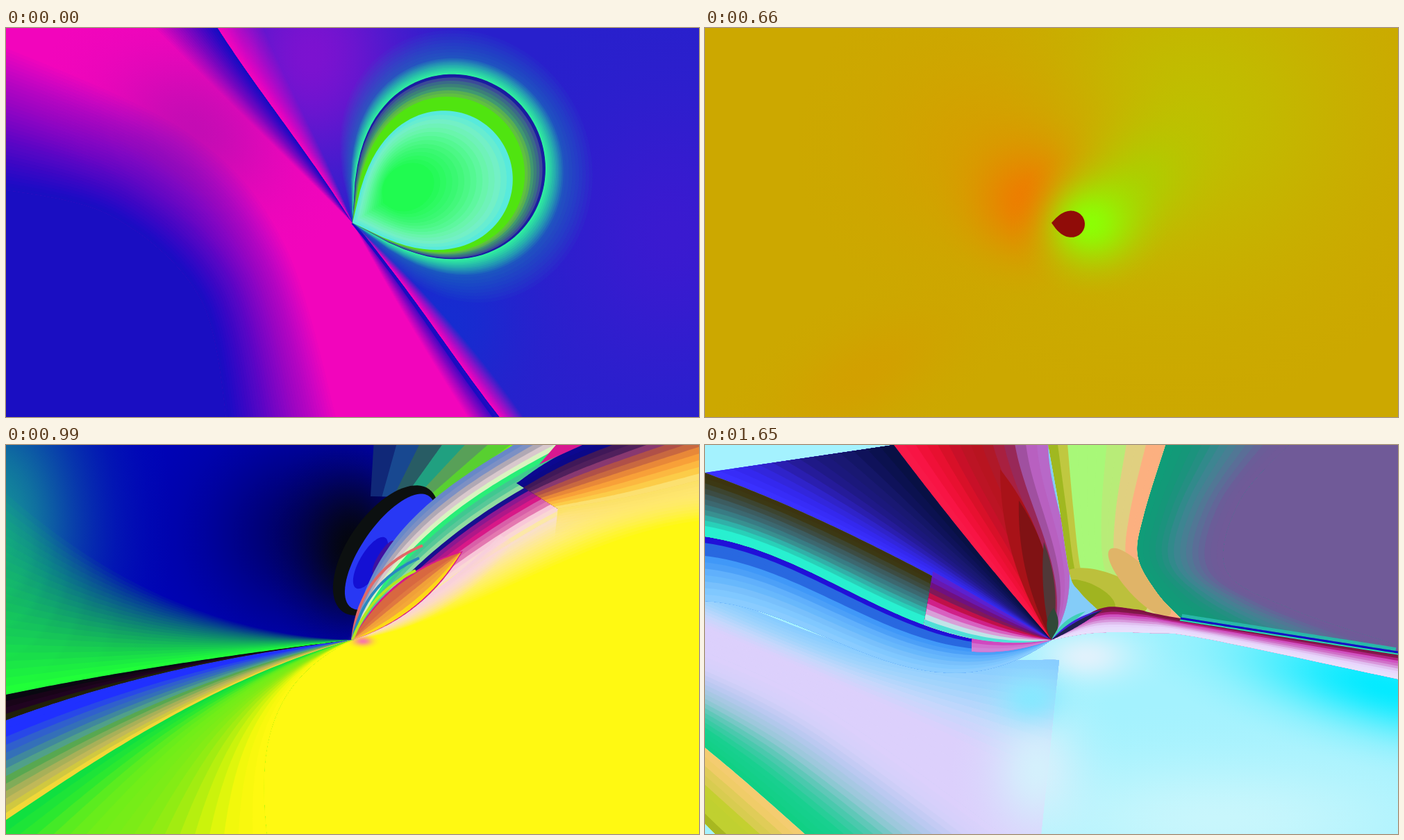
An HTML page with a canvas for the animation above (1.98 s loop, 998 by 561 pixels).

```html
<!DOCTYPE html>
<html lang="en">
<head>
<meta charset="utf-8">
<title>Colour fields</title>
<style>
html, body { margin: 0; width: 100%; height: 100%; overflow: hidden; }
canvas { display: block; width: 998px; height: 561px; }
</style>
</head>
<body>
<canvas id="stage" width="998" height="561"></canvas>
<script>
const W = 998, H = 561, STEP = 330, N = 80;
const CX = 499, CY = 281;
const RIGHT = [[W, H], [W, 0]], LEFT = [[0, H], [0, 0]];
let g;

const mix = (a, b, t) => a + (b - a) * t;
const samples = f => Array.from({ length: N + 1 }, (_, k) => f(k / N));
const rad = deg => deg * Math.PI / 180;

// Smooth curve through a few points
function curve(...p) {
  const last = p.length / 2 - 1;
  const at = (i, axis) => p[2 * Math.min(last, Math.max(0, i)) + axis];
  return samples(s => {
    const i = Math.min(Math.floor(s * last), last - 1), t = s * last - i;
    return [0, 1].map(axis => {
      const [a, b, c, d] = [-1, 0, 1, 2].map(j => at(i + j, axis));
      return b + t * (c - a + t * (2 * a - 5 * b + 4 * c - d + t * (3 * (b - c) + d - a))) / 2;
    });
  });
}
// Ray from the centre to (x, y), bent sideways by a, then b
function ray(x, y, a = 0, b = a) {
  const dx = x - CX, dy = y - CY, len = Math.hypot(dx, dy);
  return samples(t => {
    const s = 1 - t, side = 3 * t * s * (s * a + t * b) / len;
    return [CX + dx * t - dy * side, CY + dy * t + dx * side];
  });
}
// Drop with its tip in the centre, open between two angles
function rose(r, from, to) {
  return samples(t => {
    const a = rad(mix(from, to, t)), d = r * Math.sqrt(Math.abs(Math.sin(Math.PI * t)));
    return [CX + d * Math.cos(a), CY + d * Math.sin(a)];
  });
}
function oval(x, y, rx, ry, tilt = 0) {
  const c = Math.cos(rad(tilt)), s = Math.sin(rad(tilt));
  return samples(t => {
    const a = Math.PI * (1 + 2 * t), u = rx * Math.cos(a), v = ry * Math.sin(a);
    return [x + u * c - v * s, y + u * s + v * c];
  });
}
const toward = (pts, x, y, t) => pts.map(p => [mix(p[0], x, t), mix(p[1], y, t)]);
const part = (pts, t) => pts.slice(0, Math.round(N * t));
const rev = pts => [...pts].reverse();

function trace(pts) {
  g.beginPath();
  pts.forEach(([x, y]) => g.lineTo(x, y));
}
function fill(pts, color) {
  trace(pts);
  g.fillStyle = color;
  g.fill();
}
function line(pts, color, width) {
  trace(pts);
  g.strokeStyle = color;
  g.lineWidth = width;
  g.stroke();
}
function within(shape, draw) {
  g.save();
  trace(shape);
  g.clip();
  draw();
  g.restore();
}

const rgb = hex => [1, 3, 5].map(i => parseInt(hex.slice(i, i + 2), 16));
function ramp(colors, t) {
  const u = t * (colors.length - 1), i = Math.floor(u);
  const a = rgb(colors[i]), b = rgb(colors[i + 1] || colors[i]);
  return `rgb(${a.map((v, k) => Math.round(mix(v, b[k], u - i)))})`;
}
function strips(a, b, n, paint) {
  for (let i = 0; i < n; i++) {
    const edge = a.map(([x, y], k) => [mix(x, b[k][0], i / n), mix(y, b[k][1], i / n)]);
    paint([...edge, ...rev(b)], i);
  }
}
// Bands of colour between two curves
function sweep(a, b, colors, n) {
  const list = colors.split(' ');
  n = n || list.length;
  strips(a, b, n, (pts, i) => fill(pts, ramp(list, n > 1 ? i / (n - 1) : 0)));
}
// Bands between two closed rings
function rings(a, b, colors, n) {
  const list = colors.split(' ');
  for (let i = 0; i < n; i++)
    fill(a.map(([x, y], k) => [mix(x, b[k][0], i / n), mix(y, b[k][1], i / n)]), ramp(list, i / (n - 1)));
}
// One colour growing from clear at a to solid at b
function fade(a, b, color, n = 24) {
  strips(a, b, n, (pts, i) => {
    g.globalAlpha = 1 / (n - i);
    fill(pts, color);
  });
  g.globalAlpha = 1;
}
const leaf = (x, y, left, right, colors) => sweep(ray(x, y, -left), ray(x, y, right), colors);

// Soft spot of colour with a bell-shaped falloff
function glow(x, y, rx, ry, color, tilt = 0) {
  const grad = g.createRadialGradient(0, 0, 0, 0, 0, 1), end = Math.exp(-4);
  for (let t = 0; t <= 1; t += 1 / 16) {
    const a = (Math.exp(-4 * t * t) - end) / (1 - end);
    grad.addColorStop(t, `rgba(${rgb(color)},${a})`);
  }
  g.save();
  g.translate(x, y);
  g.rotate(rad(tilt));
  g.scale(rx, ry);
  g.fillStyle = grad;
  g.fillRect(-1, -1, 2, 2);
  g.restore();
}

function drop() {
  const up = ray(305, 0, 6, -4), down = ray(711, 561, -10, 2);
  g.fillStyle = '#f205bc';
  g.fillRect(0, 0, W, H);
  glow(270, 150, 240, 190, '#c40cb4', 30);
  const cold = curve(-20, 230, 150, 270, 280, 390, 320, 580);
  fade(curve(-20, 20, 260, 150, 400, 310, 480, 580), cold, '#1a0ec2', 40);
  fill([...cold, [0, H]], '#1a0ec2');
  within([...rev(up), ...down, ...RIGHT], () => {
    g.fillStyle = '#2820cc';
    g.fillRect(0, 0, W, H);
    glow(440, 40, 260, 330, '#7c12d0');
    glow(640, 420, 190, 240, '#162cd0');
    glow(960, 300, 300, 380, '#3a1ad0');
  });
  fade(ray(215, 0), up, '#160cc2');
  fade(ray(665, 561, 4), down, '#160cc2');
  fade(ray(370, 0, 8, -4), up, '#f405bc');
  fade(ray(745, 561, -14), down, '#f405bc');
  line(ray(703, 561, -8, 2), '#1a0cc0', 4);

  const rim = rose(298, -88, 30), lime = rose(265, -82, 27.5), cyan = rose(245, -78, 27);
  fade(rose(362, -104, 50), rim, '#1c70b8', 14);
  fade(rose(322, -94, 38), rim, '#30eca0', 10);
  rings(rim, lime, '#1a1ca0 #3c4a98 #3a6a88 #3c8078 #409870 #58b050 #60c040', 7);
  fill(lime, '#50e410');
  rings(cyan, oval(575, 230, 35, 28, -35), '#58eadc #74f0c8 #6cf4b0 #58f898 #48f880 #38f870 #2cfa60 #20fb50', 14);
}

function wave() {
  g.fillStyle = '#a0c42c';
  g.fillRect(0, 0, W, H);
  glow(20, 10, 330, 160, '#14b048');
  glow(330, 350, 200, 120, '#a8d834', -30);
  glow(40, 190, 190, 90, '#a8a010');
  const sun = curve(325, -10, 365, 120, 495, 278);
  fade(curve(170, -10, 190, 150, 300, 330), sun, '#feff02', 20);
  fill([...sun, [700, 200], [800, -10]], '#feff02');
  rings(oval(10, 420, 215, 245), oval(15, 500, 60, 60), '#a4a414 #98900c #786408 #604c06 #503608', 18);

  const hill = curve(CX, CY, 560, 245, 615, 232, 665, 258, 735, 333, 805, 358, 900, 335, W, 283);
  const sky = ray(830, 0, 20, -12);
  fill([...sky, [W, 0], [W, 420], [700, 420]], '#0850c0');
  within([...sky, [W, 0], [W, 420], [700, 420]], () => {
    glow(780, 310, 300, 200, '#005cb0');
    glow(740, 80, 180, 90, '#2058c8', -40);
  });
  fill([...hill, [W, H], [600, H]], '#ff54b4');
  const foot = ray(195, 561, 4, 2), night = ray(630, 561, 12, -22);
  sweep(night, curve(CX, CY, 570, 243, 640, 250, 690, 340, 730, 430, 790, 561),
    '#1c10ec #4018c8 #6020b0 #7c24a8 #9c30a4 #c040a8 #e450ac #fc56b2', 16);
  fill([...foot, ...rev(night)], '#0404ff');
  fade(ray(570, 561, 12, -10), night, '#1c10ec', 8);
  sweep(ray(636, 0, 12, -10), ray(704, 0, 30, -14), '#f4f430 #e8dc78 #dca89c #cf7a38 #cf7a28 #b04a80 #a81890 #a81890');
  sweep(ray(704, 0, 30, -14), sky, '#98f088 #6a9cc0 #6a9cc0 #4c80c4 #4478c8 #3870c8 #2860c8 #1858c4');
  sweep(ray(70, 561, 27, 25), foot,
    '#90a020 #78a828 #60a838 #38b040 #1ea838 #1ea838 #d08038 #d08038 #904050 #783058 #60e060 #50d860 #2878c8 #2868c0 #184050 #183858 #1020a0');
}

function ember() {
  g.fillStyle = '#cca800';
  g.fillRect(0, 0, W, H);
  glow(700, 130, 460, 420, '#c0be00', -50);
  glow(420, 190, 300, 270, '#d69e00', 20);
  glow(230, 500, 260, 120, '#d2a000', -30);
  glow(466, 249, 140, 140, '#ee7c00');
  glow(610, 240, 200, 130, '#acd000', -45);
  glow(554, 282, 115, 105, '#8cff04');
  fill(rose(48, -48, 55), '#900c08');
}

function petals() {
  g.fillStyle = '#0003b8';
  g.fillRect(0, 0, W, H);
  glow(450, 130, 300, 260, '#000060');
  glow(500, 150, 130, 180, '#04060c');
  glow(-20, 120, 260, 420, '#149098');
  const black = ray(0, 360, 6, 8), low = ray(0, 397, 18, 22), gold = ray(-40, 568, 44, 22);
  fade(ray(0, 70, -70, -60), black, '#20ff38');
  const far = ray(1100, 50, -19, -137);
  fill([...rev(low), ...far, [W, H], [0, H]], '#fff912');
  sweep(black, low, '#080810 #180418 #200420 #202008');
  sweep(low, gold, '#2030ff #2030ff #2848e8 #3060cc #3470b8 #40889c #50a088 #58a850 #80ac58 #a8b058 #c0b858 #d0c840 #f0d838');
  sweep(gold, ray(380, 600, 110, 60), '#10e040 #28e830 #58ec20 #70ee18 #78ec18 #88ec14 #a8ec10 #d0f40c #f4f80c #fef910', 18);

  sweep(curve(530, -10, 525, 74), curve(775, -10, 640, 76), '#102878 #184890 #285c64 #20a080 #58a058 #58d030 #78f010');
  fill(oval(547, 152, 108, 54, -55), '#0c1010');
  fill(oval(553, 154, 98, 40, -55), '#2838f4');
  fill(oval(525, 170, 42, 16, -60), '#1410d4');
  fill(oval(544, 162, 28, 8, -58), '#4010a0');
  sweep(ray(900, -120, -140, 0), far,
    '#6888c8 #7c90c4 #b0a8b4 #d8c8cc #d8f4c0 #28ee78 #40c890 #58c898 #90dca0 #181090 #8c1890 #b01888 #d81888 #d860a8 #e478b0 #f8c8d8 #fad8d4 #fce8a8');
  fade(ray(1100, 110, 25, -90), far, '#fae0c8', 16);
  const amber = curve(795, 92, 900, 74, 1010, 48);
  sweep(curve(735, 55, 815, 6, 1010, -70), amber,
    '#0c0890 #0c0888 #401858 #50205c #883870 #b05048 #c86840 #e88838 #f8a038 #fcb840 #fccc48 #fce070');
  fade(curve(790, 135, 900, 120, 1010, 100), amber, '#fce268', 12);
  fill([[792, 0], [830, 0], [768, 28]], '#d81890');
  fade(ray(730, 140, 40), ray(712, 130, 14), '#f8d0dc', 10);
  leaf(658, 153, 30, 26, '#d81888');
  leaf(655, 155, 26, 24, '#d86840 #d86840 #e07840 #f0a038 #f4a838 #fcd818');
  ['#e06868', '#2888c0', '#b0e820'].forEach((c, i) => line(ray(600 - i * 5, 145 + i * 18, -34 + i * 8), c, 4));
  glow(514, 283, 26, 12, '#f878a8');
}

function valley() {
  const spine = curve(CX, CY, 459, 236, 500, 184, 600, 130, 690, 76, 775, 0);
  const tail = ray(465, 448, -43, -18);
  g.fillStyle = '#58e650';
  g.fillRect(0, 0, W, H);
  glow(600, 520, 300, 260, '#90d880');
  glow(620, 190, 200, 160, '#74de6c');
  glow(980, 190, 280, 140, '#20ee30', -40);
  glow(720, 95, 140, 70, '#20ee30', -40);
  glow(545, 312, 90, 90, '#38ec40');

  const west = [...rev(spine), ...tail, [380, H], ...LEFT];
  const dome = curve(148, 0, 270, 93, 415, 130, 560, 114, 690, 75, 775, 0);
  within(west, () => {
    g.fillStyle = '#3468fc';
    g.fillRect(0, 0, W, H);
    glow(190, 120, 330, 150, '#6c20ff', 30);
    glow(110, 40, 190, 110, '#8408ff', 35);
    glow(400, 175, 300, 120, '#a808fa', 8);
    glow(180, 275, 280, 130, '#2894ff', 10);
    glow(370, 390, 160, 240, '#6814f8', 35);
    glow(450, 350, 110, 200, '#2c10ec', 30);
    glow(370, 250, 130, 30, '#6868f8', 5);
    glow(440, 230, 60, 60, '#4090f8');
    fade(toward(dome, 470, -20, -.24), dome, '#1010ec', 8);
    fill(dome, '#563c76');
    sweep(dome, toward(dome, 470, -20, .5), '#f41ce0 #f41ce0 #e824d4 #a838b0 #803c90 #703c84 #643c7c #5c3c78 #563c76', 14);
  });
  fill([[600, 0], [640, 0], [618, 92], [550, 84]], '#781c80');
  fill(oval(592, 97, 34, 11, -8), '#b830a8');
  fill([[632, 0], [712, 0], [664, 86], [610, 58]], '#b0042c');
  fill(oval(635, 78, 21, 20), '#d80848');
  fill([[708, 0], [775, 0], [655, 90]], '#b000f0');
  fill([[732, 0], [772, 0], [680, 78]], '#d81050');
  sweep(curve(773, 0, 745, 36, 705, 62), curve(818, 0, 775, 44, 705, 62), '#f6ec20');
  fade(ray(700, 105, 60), ray(625, 122, 18), '#a0f4dc', 8);
  sweep(curve(640, 108, 500, 184, 459, 236, CX, CY), curve(625, 122, 545, 195, 512, 240, CX, CY),
    '#30f4d0 #1410d8 #1410d8 #1c30f0 #2868f8 #3090f8 #30e0d0 #30e8d0 #a0f0d8 #a0f0d8 #a0f0d8 #a0f0d8');
  leaf(622, 124, 18, 20, '#a8d44c #a8d44c #b8f010 #b8f010');
  const crest = spine.slice(N * .55);
  line(crest, '#2830d0', 8);
  line(crest, '#503070', 4);
  line(toward(crest, 0, 0, .004), '#60b8a8', 1.5);

  sweep(curve(466, 561, 478, 440, 510, 345), curve(590, 561, 530, 430, 512, 345),
    '#30f0c8 #30e8c8 #50d890 #78fc30 #78f830 #a0f0dc #a0f0dc #90e8b8 #90e8b0 #88e498 #84e08c #80dc80');
  line(ray(469, 450, -52, -22), '#30d8c0', 4);
  line(tail, '#281890', 5);
  fill(oval(489, 315, 36, 13, 92), '#f020e0');
  fill(oval(496, 310, 30, 7, 85), '#c040a0');
  fill(oval(495, 287, 9, 4, 60), '#e0d070');
  sweep(curve(467, 446, 422, 492, 380, 561), curve(467, 446, 467, 500, 463, 561),
    '#c4f2b8 #c4f2b8 #d820e0 #d820e0 #d820e0 #6850d0 #c4f2b8');

  const bank = curve(1030, 245, 905, 340, 858, 470, 890, 590);
  fade(toward(bank, 1020, 520, -.25), bank, '#08f020', 12);
  sweep(bank, curve(1070, 380, 1028, 440, 1000, 515, 1005, 590),
    '#f8ec20 #f8ec20 #f4ec1c #e8ec18 #d8ec18 #c8ec10 #b8ec10 #b4ec10 #b0e810 #b0e810 #a8c820 #a4c420 #a0c020 #a0c020 #b80840 #b8c820 #7050b8 #c08870 #b80840 #b80840');
  fill(oval(930, 510, 82, 21, 94), '#98f008');
}

function fan() {
  g.fillStyle = '#a4f2fe';
  g.fillRect(0, 0, W, H);
  glow(740, 540, 560, 170, '#c8f6fc');
  glow(980, 350, 400, 120, '#04eaff', 14);
  glow(550, 305, 130, 70, '#e0f2fc');
  const shore = curve(-20, 420, 60, 487, 165, 580), ridge = curve(-20, 290, 180, 385, 480, 600);
  sweep(shore, ridge, '#10d084 #18d090 #50c8b0 #98c8d8 #b8c8f0 #d4d0fa #dcd0fc', 20);
  sweep(ridge, curve(-20, 200, 250, 300, 510, 310), '#dcd0fc #dcd0fc #dcd0fc #c4d8fc #a0d4fc #88ccff', 20);
  glow(480, 470, 130, 170, '#d4f0fc');
  glow(470, 365, 90, 70, '#88e8ff');
  sweep(shore, curve(-30, 515, 10, 556, 30, 575), '#f4cc70 #f0cc68 #e0cc58 #d8cc50 #c4d030 #c0d030 #c0d030 #a8b820');

  const olive = ray(0, 40, 8, 20), teal = ray(0, 132, -85, 25), red = ray(272, 0, -4);
  sweep(teal, ray(0, 225, -150, 10), '#2010d8 #2868e0 #2868e0 #4098f8 #4ca0f8 #60b0fc #68b8fc #78c0fc #80c8ff #8accff');
  fill([...olive, ...rev(red), [0, 0]], '#3a30ff');
  sweep(olive, red, '#3a30ff #3428f0 #3024d0 #281ca0 #1c1880 #181870 #0e1258 #081044', 14);
  sweep(olive, teal, '#3c3410 #3c3814 #3c4430 #3c4c44 #3c5c60 #3c6870 #387c84 #389090 #30b0a8 #28d0b8 #28f0d0 #28f0d0');
  sweep(part(ray(0, 20, 8, 20), .36), part(teal, .36),
    '#5c20d0 #6818b0 #701080 #801858 #c01048 #d02088 #d860c0 #d8a0d8 #c0e4e8 #50e0d8');
  sweep(part(teal, .22), part(ray(0, 170, -110, 20), .22), '#d048c0 #d070d0 #d080d8');

  const wine = ray(494, 0, 62, 0);
  const left = curve(494, 0, 510, 90, 525, 185, 540, 212, 566, 238);
  const right = curve(663, 0, 632, 100, 623, 160, 650, 212, 685, 250);
  sweep(red, wine, '#f81848 #f81444 #f01038 #e81030 #d81028 #c81028 #bc1424 #b81420 #b01828 #a82040 #982858 #a050a0 #b860c0 #b868c8');
  leaf(425, 35, 25, 34, '#a81218');
  leaf(452, 80, 18, 26, '#801214');
  leaf(488, 140, 8, 14, '#503838');
  leaf(502, 235, 11, 11, '#304838');
  fill([...wine, ...left], '#84ccf8');
  leaf(548, 240, 10, 0, '#40d0b8');

  const floor = curve(685, 250, 800, 268, W, 299);
  fill([...right, ...floor, [W, 0]], '#705a98');
  sweep(right, curve(850, -10, 770, 80, 750, 180, 840, 235, 1000, 290),
    '#109c78 #149878 #209080 #388890 #4c7c94 #5c6c98 #6c5c98 #705a98', 14);
  within([...left, ...rev(right)], () => {
    sweep(left, right, '#a0b820 #c0c840 #a8f878 #a8f878 #a8f878 #a8f878 #b8ec78 #b8ec78 #e0d080 #e0d080 #fcb080 #fcb080');
    fill(oval(575, 212, 66, 28, 20), '#bcc03c');
    fill(oval(552, 218, 42, 18, 25), '#a0b420');
    fill(oval(626, 198, 64, 20, 48), '#e0b468');
  });
  sweep(curve(CX, CY, 566, 237, 620, 237, 685, 250, 1000, 300), curve(CX, CY, 560, 271, 640, 271, 720, 279, 1000, 338),
    '#801040 #801848 #b02080 #d050c0 #d070c8 #d898dc #e0c0f0 #e8d4fc #e8dcfc #e8e0fc');
  leaf(572, 238, 10, 3, '#4020d8 #202050 #202050');
  line(toward(floor, 800, 0, .015), '#28b8a8', 5);
  line(floor, '#1010c8', 3);
  line(toward(floor, 800, 0, -.01), '#20e0b8', 2);
}

const makeCanvas = () => Object.assign(document.createElement('canvas'), { width: W, height: H });
const stage = document.getElementById('stage').getContext('2d');
const scenes = [drop, wave, ember, petals, valley, fan].map(draw => {
  const c = makeCanvas();
  g = c.getContext('2d');
  draw();
  return c;
});

let shown = -1;
const start = performance.now();
function tick() {
  const i = Math.floor((performance.now() - start) / STEP) % scenes.length;
  if (i !== shown) stage.drawImage(scenes[shown = i], 0, 0);
  requestAnimationFrame(tick);
}
tick();
</script>
</body>
</html>
```
